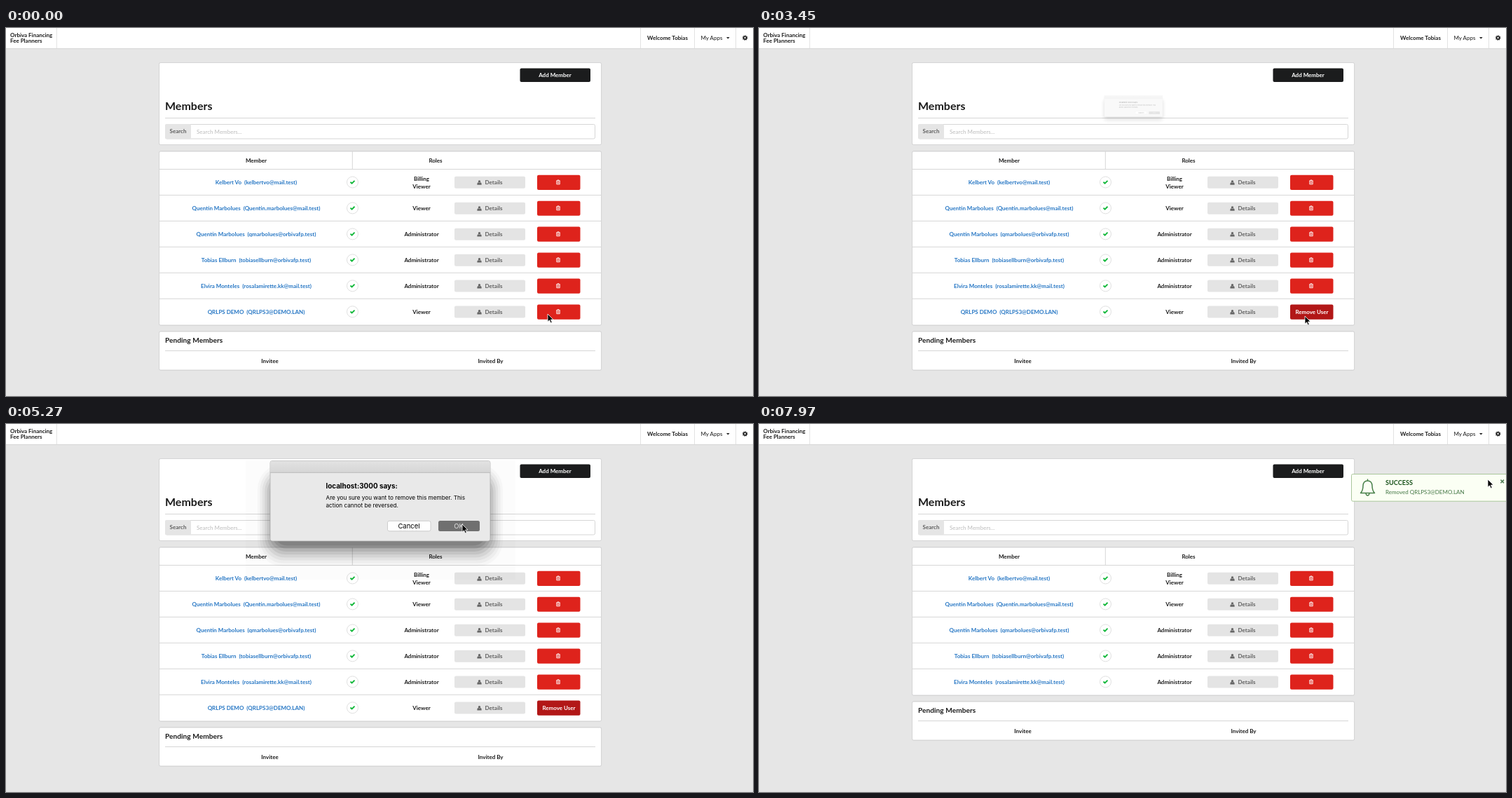
Recreate the animation shown at these times as an HTML page. Size 1066 px wide and 525 px high, loop 8000 ms.

```html
<!DOCTYPE html>
<html lang="en">
<head>
<meta charset="utf-8">
<title>Members</title>
<style>
html, body { margin: 0; width: 100%; height: 100%; overflow: hidden; background: #e6e6e6; }
svg { display: block; width: 100%; height: 100%; }
text { font: 8px Lato, sans-serif; fill: #1c1c1c; white-space: pre; }
.b { font-weight: 700; }
.mid { text-anchor: middle; }
.h1 { font-size: 16px; }
.h3 { font-size: 10.2px; }
.white { fill: #fff; }
.link { fill: #2576c4; }
.hint { fill: #bdbdbd; }
.soft { fill: #5f5f5f; }
.success { font-size: 9.14px; fill: #1a531b; }
.note { fill: #457746; }
.line { stroke: #d6d6d6; }
.card { fill: #fff; stroke: #d5d5d6; filter: drop-shadow(0 .6px .6px #0002); }
.details { fill: #e4e4e4; }
.late .details { fill: #dedede; }
.red { fill: #de231c; }
.mac text { font-family: Inter, sans-serif; font-size: 8.2px; fill: #000; }
.mac .title { font-size: 9.9px; }
.mac .btn { font-size: 9.5px; }
.mac .pale { fill: #e2e2e2; }
</style>
</head>
<body>
<svg viewBox="0 0 1066 525" id="stage">
  <defs>
    <linearGradient id="bar" x2="0" y2="1"><stop stop-color="#e2e2e2"/><stop offset="1" stop-color="#d6d6d6"/></linearGradient>
    <linearGradient id="ok" x2="0" y2="1"><stop stop-color="#aaa"/><stop offset="1" stop-color="#8b8b8b"/></linearGradient>
    <g id="user"><circle cy="-1.6" r="1.7"/><path d="M-3.1 3.2V1.6Q-3-.2-1.3-.2L0 .5 1.3-.2Q3-.2 3.1 1.6V3.2Z"/></g>
    <g id="trash" fill="none" stroke="#fff" stroke-width=".9"><path d="M-3-1.9H3M-1.1-2V-3H1.1V-2M-2.2-1.6V2.9H2.2V-1.6M-.8-.6V1.8M.8-.6V1.8"/></g>
    <g id="tick"><circle r="8" fill="#fff" stroke="#e0e0e0"/><path d="M-3-.3L-.9 1.7 3-2.2" fill="none" stroke="#12b83a" stroke-width="1.9"/></g>
  </defs>
  <g id="page"></g>
  <g id="menu"></g>
  <g id="toast"></g>
  <g id="dialog" class="mac"></g>
  <g id="cursor">
    <path id="arrow" d="M0 0V11.2L2.6 8.8 4.3 12.7 6.2 11.9 4.5 8H8Z" fill="#000" stroke="#fff" stroke-width=".8"/>
    <path id="hand" d="M-1.1 1Q0-.8 1.1 1V5Q2.2 4 3 5.2 4.1 4.5 4.7 5.8 6 5.4 6 7V9.5L5 13H0L-3.4 8.5Q-3 6.6-1.1 8Z" fill="#fff" stroke="#000" stroke-width=".9"/>
    <path id="beam" d="M-2.2-5.5Q0-5.5 0-4V4Q0 5.5-2.2 5.5M2.2-5.5Q0-5.5 0-4V4Q0 5.5 2.2 5.5M-1.2 1H1.2" fill="none" stroke="#222"/>
  </g>
</svg>
<script>
const $ = id => document.getElementById(id);
const text = (x, y, str, cls = '') => `<text x="${x}" y="${y}" class="${cls}">${str}</text>`;
const rect = (x, y, w, h, attrs = '') => `<rect x="${x}" y="${y}" width="${w}" height="${h}" ${attrs}/>`;
const path = (d, attrs = 'class="line"') => `<path d="${d}" ${attrs}/>`;
const use = (id, x, y, attrs = '') => `<use href="#${id}" x="${x}" y="${y}" ${attrs}/>`;
const card = (y, h) => rect(218.6, y, 631, h, 'rx="2" class="card"');

const ROW = 36.95;
const members = [
  ['Kelbert Vo', 'kelbertvo@mail.test', 'Billing', 'Viewer'],
  ['Quentin Marbolues', 'Quentin.marbolues@mail.test', 'Viewer'],
  ['Quentin Marbolues', 'qmarbolues@orbivafp.test', 'Administrator'],
  ['Tobias Ellburn', 'tobiasellburn@orbivafp.test', 'Administrator'],
  ['Elvira Monteles', 'rosalamirette.kk@mail.test', 'Administrator'],
  ['QRLPS DEMO', 'QRLPS3@DEMO.LAN', 'Viewer']
];

function memberRow([name, mail, ...roles], i) {
  const y = 220.3 + i * ROW, last = i === members.length - 1;
  const roleText = roles.map((role, k) =>
    text(593, y + 3 + (k - (roles.length - 1) / 2) * 10.4, role, 'b mid')).join('');
  return `<g ${last ? 'id="lastRow"' : ''}>`
    + path(`M219 ${y - 18.8}H849.5`)
    + text(357, y + 3, `${name}\u00a0 (${mail})`, 'b mid link')
    + use('tick', 494.5, y - .3) + roleText
    + rect(640, y - 8.5, 101, 17, 'rx="2" class="details"')
    + use('user', 675.5, y + .2, 'fill="#666"')
    + text(696, y + 2.7, 'Details', 'b mid soft')
    + rect(758, y - 10.6, 61.5, 21.2, `rx="2" class="red" ${last ? 'id="remove"' : ''}`)
    + use('trash', 788, y - .3, last ? 'id="lastTrash"' : '')
    + (last ? `<g id="removeText">${text(789, y + 2.7, 'Remove User', 'b mid white')}</g>` : '')
    + '</g>';
}

function gear(x, y) {
  return `<g transform="translate(${x} ${y})" fill="none" stroke="#222"><circle r="2" stroke-width="1.7"/>`
    + '<circle r="3.1" stroke-width="1.2" stroke-dasharray="1.3 1.135"/></g>';
}

$('page').innerHTML =
  rect(0, 0, 1066, 29, 'fill="#fff"') + path('M0 29.3H1066')
  + rect(1042, 0, 24, 29, 'id="gearBack" fill="#f3f3f3"')
  + path('M72.3 0V29M905.5 0V29M982.5 0V29M1041.5 0V29', 'stroke="#e2e2e2"')
  + text(6, 13.3, 'Orbiva Financing', 'b') + text(6, 20.6, 'Fee Planners', 'b')
  + text(944, 17, 'Welcome Tobias', 'b mid') + text(991.5, 17, 'My Apps')
  + path('M1028 12.9H1032.6L1030.3 15.4Z', 'fill="#222"') + gear(1054.6, 14)
  + card(49.5, 117)
  + rect(733.5, 57.5, 100.5, 19.5, 'rx="2" fill="#1b1c1d"') + text(783.5, 70, 'Add Member', 'b mid white')
  + text(227, 117, 'Members', 'b h1') + path('M227 128.5H841')
  + rect(227.5, 137.5, 613, 20.5, 'rx="2" fill="#fff" class="line"')
  + rect(227, 137, 37, 21.3, 'rx="2" fill="#e5e5e5"')
  + text(245.5, 150.3, 'Search', 'b mid soft') + text(272, 150.8, 'Search Members...', 'hint')
  + `<g id="tableShort">${card(176, 211)}</g><g id="tableFull">${card(176, 211 + ROW)}</g>`
  + path('M494.3 176V201.5')
  + text(357, 191.7, 'Member', 'b mid') + text(613, 191.7, 'Roles', 'b mid')
  + members.map(memberRow).join('')
  + '<g id="pending">' + card(433, 55) + text(227, 448.7, 'Pending Members', 'b h3') + path('M227 460.5H841')
  + text(376.5, 478, 'Invitee', 'b mid') + text(691.5, 478, 'Invited By', 'b mid') + '</g>';

$('menu').innerHTML =
  rect(1001.5, 29.5, 70, 73, 'class="card"') + path('M1002 76.5H1066', 'stroke="#e4e4e4"')
  + use('user', 1015.3, 40, 'fill="#222"') + text(1025.5, 43, 'My Profile')
  + `<g transform="translate(1015.3 61)" fill="#222">${use('user', 0, .3)}`
  + use('user', -4, -1, 'transform="scale(.75)"') + use('user', 4, -1, 'transform="scale(.75)"') + '</g>'
  + text(1025.5, 63.8, 'Members')
  + path('M1014.5 88H1012.3V93.5H1014.5M1014 90.7H1018M1016.3 88.7L1018.5 90.7 1016.3 92.8', 'fill="none" stroke="#222" stroke-width="1.1"')
  + text(1025.5, 93.8, 'Logout');

$('toast').innerHTML =
  rect(845.5, 71.5, 230, 38.7, 'rx="2" fill="#fbfff4" stroke="#a9c69b"')
  + path('M858.5 98.5Q862 95 862 88Q862.5 81 868.5 81Q874.5 81 875 88Q875 95 878.5 98.5ZM868.5 81V78.5M866 99Q866.5 102 868.5 102Q870.5 102 871 99',
    'fill="none" stroke="#48804a" stroke-width="1.5" stroke-linejoin="round"')
  + text(894, 86.5, 'SUCCESS', 'b success')
  + text(894, 99.5, 'Removed QRLPS3@DEMO.LAN', 'note')
  + path('M1058.4 79.6L1063 84.2M1063 79.6L1058.4 84.2', 'stroke="#55805a" stroke-width="1.6"');

// Banded shadow: nested rounded boxes, darkest under the bottom edge.
const bands = Array.from({ length: 8 }, (_, i) => {
  const spread = 18 - i * 3.4, top = 57 + i * 3.5, bottom = 203 - i * 4.2;
  return rect(377 - spread, top, 314 + 2 * spread, bottom - top,
    `rx="${36 - i * 2.5}" fill="#000" opacity="${.025 + i * .012}"`);
}).join('');

$('dialog').innerHTML =
  rect(342, 52, 385, 170, 'fill="#000" opacity=".012"') + bands
  + rect(377, 52.5, 314, 114.5, 'rx="3" fill="#e9e9e9" stroke="#aaa" stroke-width=".7"')
  + path('M377.3 69V55.5Q377.3 52.8 380 52.8H688Q690.7 52.8 690.7 55.5V69Z', 'fill="url(#bar)"')
  + path('M377 69.3H691', 'stroke="#b9b9b9"')
  + text(456.5, 91.7, 'localhost:3000 says:', 'b title')
  + text(456.5, 108.3, 'Are you sure you want to remove this member. This')
  + text(456.5, 118.8, 'action cannot be reversed.')
  + rect(544.5, 138.3, 61.5, 14.5, 'rx="2.5" fill="#fff" stroke="#c3c3c3" stroke-width=".8"')
  + text(575, 148.7, 'Cancel', 'mid btn')
  + rect(617, 138, 59, 15, 'rx="2.5" fill="url(#ok)" id="okBack"')
  + text(646, 148.7, 'OK', 'mid btn pale');

const LOOP = 8000;
// time, x, y, shape
const pointer = [
  [0, 773, 408, 'arrow'], [230, 771, 410, 'arrow'], [440, 770, 412, 'arrow'], [560, 766, 420, 'arrow'],
  [680, 763, 425, 'arrow'], [960, 764, 423, 'arrow'], [1200, 766, 418, 'arrow'], [1440, 770, 412, 'hand'],
  [1560, 773, 408, 'hand'], [1680, 776, 403, 'hand'], [1800, 780, 399, 'hand'], [1910, 783, 402, 'hand'],
  [2030, 783, 404, 'hand'], [2150, 782, 406, 'hand'], [2390, 780, 409, 'hand'], [2740, 779, 411, 'hand'],
  [3100, 780, 412, 'hand'], [3330, 779, 411, 'arrow'], [3860, 775, 402, 'arrow'], [3980, 757, 362, 'arrow'],
  [4090, 735, 300, 'arrow'], [4210, 713, 235, 'arrow'], [4330, 698, 191, 'arrow'], [4450, 680, 173, 'arrow'],
  [4560, 663, 164, 'arrow'], [4680, 660, 158, 'arrow'], [4790, 656, 151, 'arrow'], [4910, 653, 146, 'arrow'],
  [5030, 651, 143, 'arrow'], [5740, 652.5, 146.5, 'beam'], [7200, 670, 144, 'beam'], [7320, 770, 131, 'arrow'],
  [7440, 862, 119, 'arrow'], [7550, 940, 98, 'arrow'], [7670, 993, 81, 'arrow'], [7850, 1030, 80, 'arrow'],
  [7970, 1040, 79, 'arrow']
];
const removeFill = [[0, '#de231c'], [1560, '#d71b17'], [1680, '#d01212'], [3330, '#b21717'], [5620, '#cf0303']];
const labelFade = [[0, 0], [1800, .35], [1910, .8], [2030, 1]];
// time, scale, opacity
const dialogPose = [[0, 1, 0], [3450, .265, .25], [3600, 1, 1], [5620, 1, .4], [5740, 1, 0]];

const at = (steps, t) => steps.findLast(step => step[0] <= t);
const show = (id, on) => { $(id).style.display = on ? '' : 'none'; };

function draw(t) {
  const [, x, y, shape] = at(pointer, t);
  $('cursor').setAttribute('transform', `translate(${x} ${y})`);
  for (const id of ['arrow', 'hand', 'beam']) show(id, id === shape);

  const menuOpen = t >= 1200 && t < 3330;
  show('menu', menuOpen);
  show('gearBack', menuOpen);
  show('toast', t >= 6220);

  const fade = at(labelFade, t)[1];
  $('remove').style.fill = at(removeFill, t)[1];
  $('removeText').style.opacity = fade;
  $('lastTrash').style.opacity = 1 - fade;

  const [, scale, opacity] = at(dialogPose, t);
  show('dialog', opacity > 0);
  $('dialog').style.opacity = opacity;
  $('dialog').setAttribute('transform', `translate(534.5 112) scale(${scale}) translate(-534.5 -112)`);
  $('okBack').setAttribute('fill', t >= 5270 ? '#707070' : 'url(#ok)');

  const removed = t >= 7670;
  $('page').classList.toggle('late', t >= 5620 && !removed);
  show('lastRow', !removed);
  show('tableFull', !removed);
  show('tableShort', removed);
  $('pending').setAttribute('transform', `translate(0 ${removed ? -ROW : 0})`);
}

const start = performance.now();
function tick() {
  draw((performance.now() - start) % LOOP);
  requestAnimationFrame(tick);
}
tick();
</script>
</body>
</html>
```
